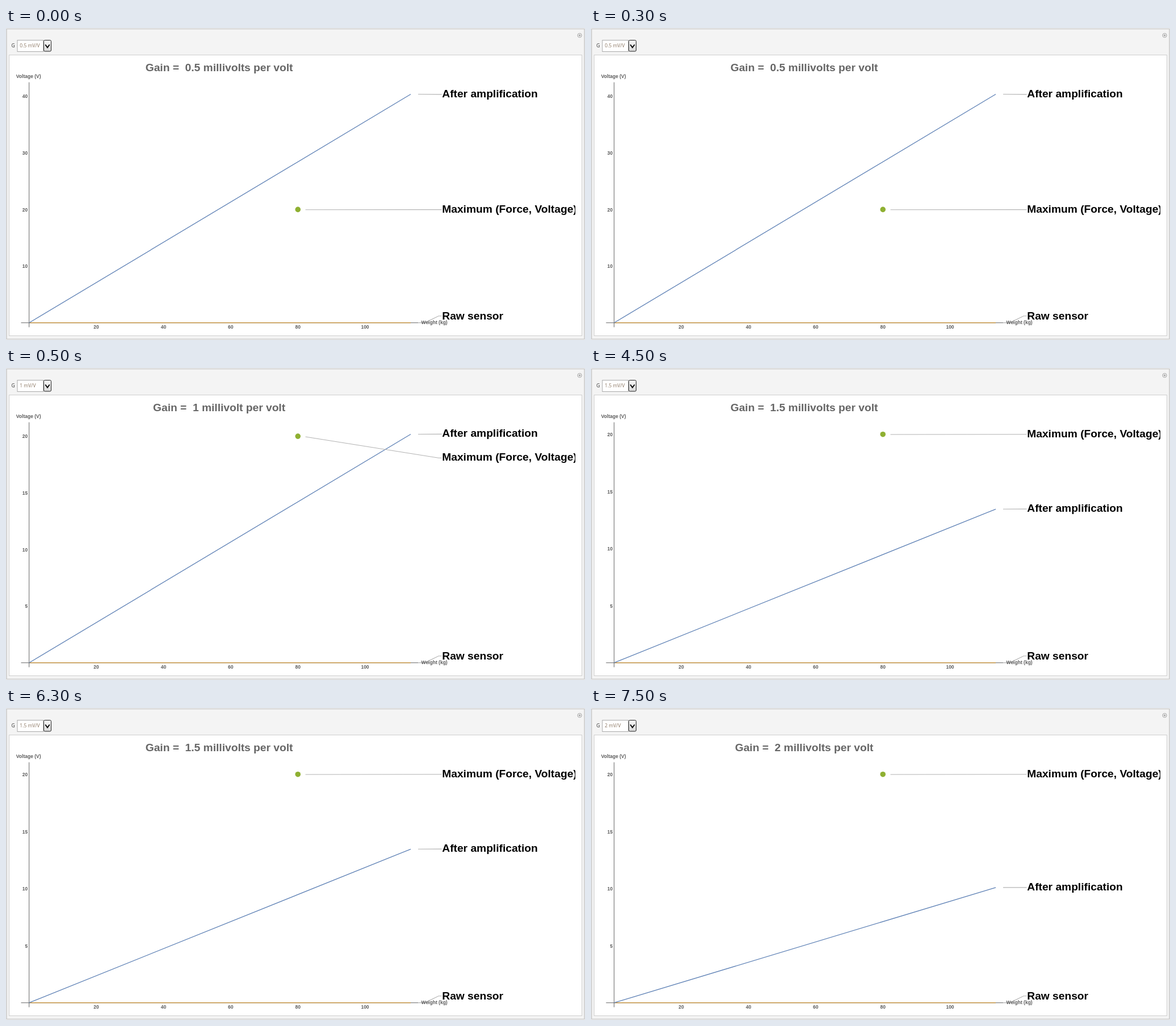
Recreate the animation shown at these times as an HTML page. Size 1020 by 549 pixels, loop 8 s.

```html
<!DOCTYPE html>
<html lang="en">
<head>
<meta charset="utf-8">
<title>Gain and amplified voltage</title>
<style>
  html, body { margin: 0; width: 100%; height: 100%; overflow: hidden; background: #fff; }
  svg { display: block; width: 1020px; height: 549px; }
  text { font-family: "Liberation Sans", Arial, sans-serif; font-weight: bold; white-space: pre; }
  .small { font-size: 8.53px; fill: #5c5c5c; }
  .label { font-size: 19.2px; fill: #000; }
  .title { font-size: 19.2px; fill: #666; text-anchor: middle; }
  .ui { font: 8.5px "Open Sans", "Noto Sans", sans-serif; }
  .mid { text-anchor: middle; }
  .end { text-anchor: end; }
  .axis { stroke: #666; stroke-width: 1; }
  .lead { fill: none; stroke: #b3b3b3; stroke-width: 1.1; }
</style>
</head>
<body>
<svg viewBox="0 0 1020 549">
  <defs>
    <clipPath id="plot"><rect x="6" y="48" width="997" height="494"/></clipPath>
    <linearGradient id="btn" x2="0" y2="1">
      <stop stop-color="#fafafa"/><stop offset="1" stop-color="#d8d8d8"/>
    </linearGradient>
  </defs>

  <rect x="1" y="1.5" width="1018" height="546" fill="#f4f4f4" stroke="#cbcbcb" stroke-width="1.6"/>
  <rect x="5.5" y="47.5" width="1009" height="494" fill="#fff" stroke="#cfcfcf"/>
  <circle cx="1010.6" cy="13" r="3.6" fill="#f8f8f8" stroke="#a0a0a0"/>
  <path d="M1008.6 13h4M1010.6 11v4" stroke="#909090"/>

  <text class="ui" x="9.4" y="34.3" fill="#333">G</text>
  <rect x="20" y="21.5" width="46" height="20" fill="#fff" stroke="#aaa"/>
  <text class="ui" id="choice" x="24.3" y="34.3" fill="#8a7560"></text>
  <rect x="66.5" y="21.5" width="13" height="19.5" rx="2" fill="url(#btn)" stroke="#222"/>
  <path d="M69.2 29.2L73 34.4L76.8 29.2" fill="none" stroke="#000" stroke-width="1.8"/>

  <g clip-path="url(#plot)">
    <text class="title" id="title" x="375.6" y="76.3"></text>
    <text class="small" x="17.8" y="88.3">Voltage (V)</text>
    <path class="axis" d="M40.7 95.5V526.5M26.5 518.7H726.5"/>
    <path d="M41 518.6H713" stroke="#c28a2c" stroke-width="1.1"/>
    <path id="line" stroke="#5e81b5" stroke-width="1.3"/>
    <circle id="dot" cx="514.2" r="4.8" fill="#8fb032"/>
    <path class="lead" d="M726.5 518.6H738L762 506.8H767.5"/>
    <path class="lead" id="ampLead"/>
    <path class="lead" id="maxLead"/>
    <text class="small" x="731.5" y="521.2">Weight (kg)</text>
    <g id="xTicks"></g>
    <g id="yTicks"></g>
    <text class="label" id="amp" x="768.3">After amplification</text>
    <text class="label" id="max" x="768.3">Maximum (Force, Voltage)</text>
    <text class="label" x="768.3" y="512.6">Raw sensor</text>
  </g>
</svg>
<script>
const LOOP = 8000, X0 = 40.7, Y0 = 518.7, KG = 5.918;

// unit: pixels per volt; ampY, maxY: heights of the two label leaders
const steps = [
  { at: 0,    gain: 0.5, unit: 9.965, tick: 10, ampY: 116.9, maxY: 319.6 },
  { at: 500,  gain: 1,   unit: 19.93, tick: 5,  ampY: 116.4, maxY: 158.3 },
  { at: 4500, gain: 1.5, unit: 20.1,  tick: 5,  ampY: 248.1, maxY: 116.8 },
  { at: 7500, gain: 2,   unit: 20.1,  tick: 5,  ampY: 315.9, maxY: 116.8 },
];

const el = id => document.getElementById(id);
const set = (id, attrs) => {
  for (const k in attrs) el(id).setAttribute(k, attrs[k]);
};
const tickText = (x, y, value, align) =>
  `<text class="small ${align}" x="${x}" y="${y}">${value}</text>`;
const leader = (x, y, endY) =>
  `M${x} ${y}L${Math.abs(endY - y) > 9 ? 762 : 766} ${endY}H767.5`;

el('xTicks').innerHTML = [20, 40, 60, 80, 100]
  .map(kg => tickText(X0 + kg * KG, 528.5, kg, 'mid')).join('');

function show(s) {
  const lineY = Y0 - 20.18 / s.gain * s.unit;
  const dotY = Y0 - 20 * s.unit;
  el('choice').textContent = `${s.gain} mV/V`;
  el('title').textContent =
    `Gain =\u00a0 ${s.gain} millivolt${s.gain === 1 ? '' : 's'} per volt`;
  set('line', { d: `M${X0} ${Y0}L713 ${lineY}` });
  set('dot', { cy: dotY });
  set('ampLead', { d: leader(726, lineY, s.ampY) });
  set('maxLead', { d: leader(527.5, dotY + (s.gain === 1 ? 0.9 : 0.3), s.maxY) });
  set('amp', { y: s.ampY + 4.9 });
  set('max', { y: s.maxY + 4.9 });
  el('yTicks').innerHTML = [1, 2, 3, 4].map(n =>
    tickText(38.3, Y0 - n * s.tick * s.unit + 3.3, n * s.tick, 'end')).join('');
}

let current;
function frame() {
  const t = performance.now() % LOOP;
  const next = steps.findLast(s => s.at <= t);
  if (next !== current) show(current = next);
  requestAnimationFrame(frame);
}
frame();
</script>
</body>
</html>
```
